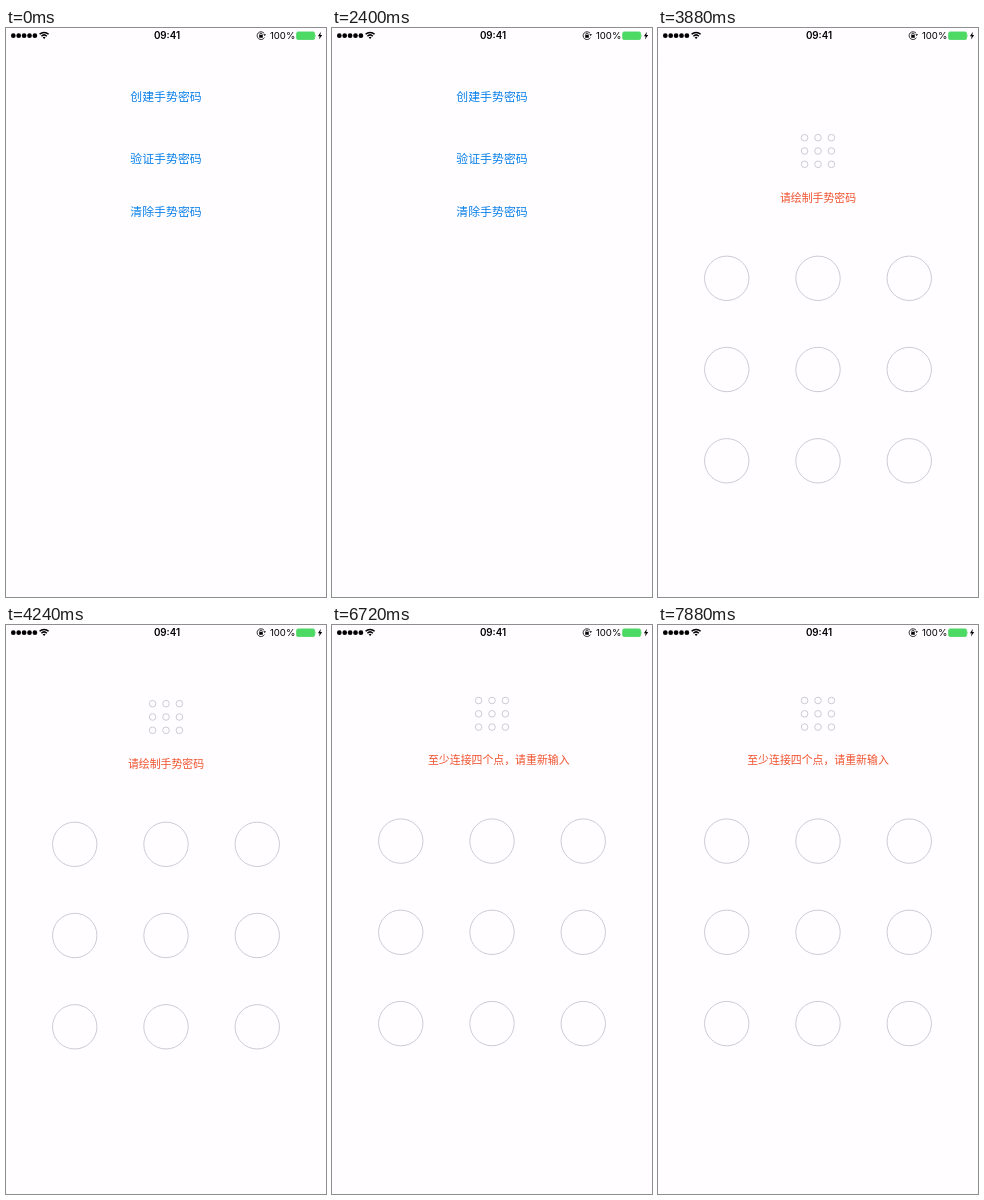
Recreate the animation shown at these times as an HTML page. Size 320 by 569 pixels, loop 8 s.

```html
<!DOCTYPE html>
<html lang="zh-CN">
<head>
<meta charset="utf-8">
<title>手势密码</title>
<style>
  html, body { margin: 0; width: 100%; height: 100%; overflow: hidden; background: #fffdff; }
  svg { display: block; width: 100vw; height: 100vh; }
  text { text-anchor: middle; font-family: "Noto Sans CJK SC", "Noto Sans CJK", sans-serif; }
  .btn { font-size: 11.9px; fill: #0b80ea; }
  .btn.down { fill: #6ab4f5; }
  .msg { font-size: 10.9px; fill: #f0512c; }
  .bar text { font-family: Inter, Roboto, sans-serif; fill: #000; }
  .page { fill: #fffdff; }
  .dot { fill: #fffdff; stroke: #c6c6d0; stroke-width: .9; }
  .on .dot { stroke: #f07c48; stroke-width: 1.3; }
  .print { display: none; fill: none; stroke: #f07c48; stroke-width: 1.25; stroke-linecap: round; }
  .on .print { display: inline; }
  .trail { fill: none; stroke: #f8cbb2; stroke-width: 6.4; stroke-linecap: round; stroke-linejoin: round; }
</style>
</head>
<body>
<svg viewBox="0 0 320 569" preserveAspectRatio="none">
  <defs>
    <path id="print" d="M-10.5-1A10.5 10.5 0 0 1-6-8.8M-4.2-9.8A10.6 10.6 0 0 1 6-8.8M7.8-7.2A10.6 10.6 0 0 1 10.6 1
      M-10 3.5Q-8.2 2.5-8.1-.5A8.1 8.1 0 0 1 3-7.5M5-6.4A8.1 8.1 0 0 1 8 2.5Q7.8 4.5 7.2 6
      M-8.3 6.6Q-5.6 4-5.6 0A5.6 5.6 0 0 1 5.6 0Q5.7 5.5 3.4 9
      M-5.8 8.8Q-3 5.5-3.1 0A3.1 3.1 0 0 1 3.1 0Q3.2 3.2 2 6M1.2 7.8Q.6 9.3-.3 10.6
      M0 0Q.2 6-2.9 10.2"/>
  </defs>

  <rect class="page" width="320" height="569"/>
  <text class="btn" id="create" x="160" y="72.6">创建手势密码</text>
  <text class="btn" x="160" y="134.5">验证手势密码</text>
  <text class="btn" x="160" y="187.9">清除手势密码</text>

  <g id="sheet">
    <rect class="page" width="320" height="569"/>
    <g id="mini"></g>
    <text class="msg" id="msg" x="160" y="139.4"></text>
    <path class="trail" id="trail"/>
    <g id="pad"></g>
  </g>

  <g class="bar">
    <g id="signal"></g>
    <g fill="none" stroke="#000" stroke-width="1.5">
      <path d="M33.6 6.3A6.4 6.4 0 0 1 42.6 6.3M35.4 8.2A3.9 3.9 0 0 1 40.8 8.2"/>
    </g>
    <path d="M36.7 9.5A2 2 0 0 1 39.5 9.5L38.1 11Z"/>
    <text x="161" y="11.2" font-size="9.8" font-weight="600">09:41</text>
    <g fill="none" stroke="#000" stroke-width=".8">
      <path d="M258.2 5.4A3.9 3.9 0 1 0 258.4 9.6"/>
      <path d="M253.9 7.2V6.2A1.1 1.1 0 0 1 256.1 6.2V7.2"/>
    </g>
    <rect x="253.2" y="7" width="3.6" height="2.8" rx=".4"/>
    <path d="M257.3 6.2H260L258.7 8Z"/>
    <text x="276.6" y="11.2" font-size="9.6">100%</text>
    <rect x="290.6" y="3.9" width="18" height="7.6" rx="1.5" fill="#4cd964" stroke="#4cd964" stroke-width=".8"/>
    <path d="M309.5 6.2Q310.9 7.7 309.5 9.2Z" fill="#4cd964"/>
    <path d="M314.9 3.8L311.9 8.2H313.7L313 11.6L316.2 6.9H314.3Z"/>
  </g>
</svg>

<script>
const LOOP = 8000, TICK = 40;
const PRESS = 3000, RISE = 3293, TOUCH = 4760, REST = 5640, RELEASE = 6520;
const SHAKE = { time: 680, count: 2, size: 7.2, steps: [-1, 0, 1, 0, -1, 0, 1, 0] };
const MID = 160, ROWS = [216.1, 307.3, 398.6], GAP = 91.25, R = 22.2;

const $ = id => document.getElementById(id);

function add(parent, name, attrs) {
  const el = document.createElementNS("http://www.w3.org/2000/svg", name);
  for (const key in attrs) el.setAttribute(key, attrs[key]);
  return parent.appendChild(el);
}

for (let i = 0; i < 5; i++) add($("signal"), "circle", { cx: 7.3 + i * 5.4, cy: 7.7, r: 2.35 });

const middle = [];
for (let i = 0; i < 9; i++) {
  const col = i % 3 - 1, row = Math.floor(i / 3);
  add($("mini"), "circle", { class: "dot", cx: MID + col * 13.4, cy: 75.5 + row * 13.3, r: 3.3 });
  const key = add($("pad"), "g", { transform: `translate(${MID + col * GAP} ${ROWS[row]})` });
  add(key, "circle", { class: "dot", r: R });
  add(key, "use", { class: "print", href: "#print" });
  if (!col) middle.push(key);
}

// Critically damped spring: share of the way still to go.
function spring(ms) {
  const x = Math.max(0, ms) * 0.0077;
  return (1 + x) * Math.exp(-x);
}

function smooth(p) {
  p = Math.min(1, Math.max(0, p));
  return p * p * (3 - 2 * p);
}

function shake(ms) {
  const turn = ms / SHAKE.time;
  if (turn < 0 || turn >= SHAKE.count) return 0;
  const s = SHAKE.steps, pos = turn % 1 * (s.length - 1), i = Math.floor(pos);
  return SHAKE.size * (s[i] + (s[i + 1] - s[i]) * (pos - i));
}

function draw(t) {
  $("create").classList.toggle("down", t >= PRESS);
  const rest = t < 3280 ? 569 : 569 * spring(t - RISE);
  $("sheet").setAttribute("transform", `translate(0 ${t >= 4640 ? 0 : rest.toFixed(2)})`);

  const held = t >= TOUCH && t < RELEASE;
  const finger = ROWS[0] + (ROWS[2] - ROWS[0]) * smooth((t - TOUCH) / (REST - TOUCH));
  middle.forEach((key, i) => key.classList.toggle("on", held && finger >= ROWS[i] - R));
  $("trail").setAttribute("d", held ? `M${MID} ${ROWS[0]}V${finger.toFixed(2)}` : "");

  $("msg").textContent = t < RELEASE ? "请绘制手势密码" : "至少连接四个点，请重新输入";
  $("msg").setAttribute("x", MID + shake(t - RELEASE));
}

function frame() {
  const t = performance.now() % LOOP;
  draw(Math.floor(t / TICK) * TICK);
  requestAnimationFrame(frame);
}
frame();
</script>
</body>
</html>
```
